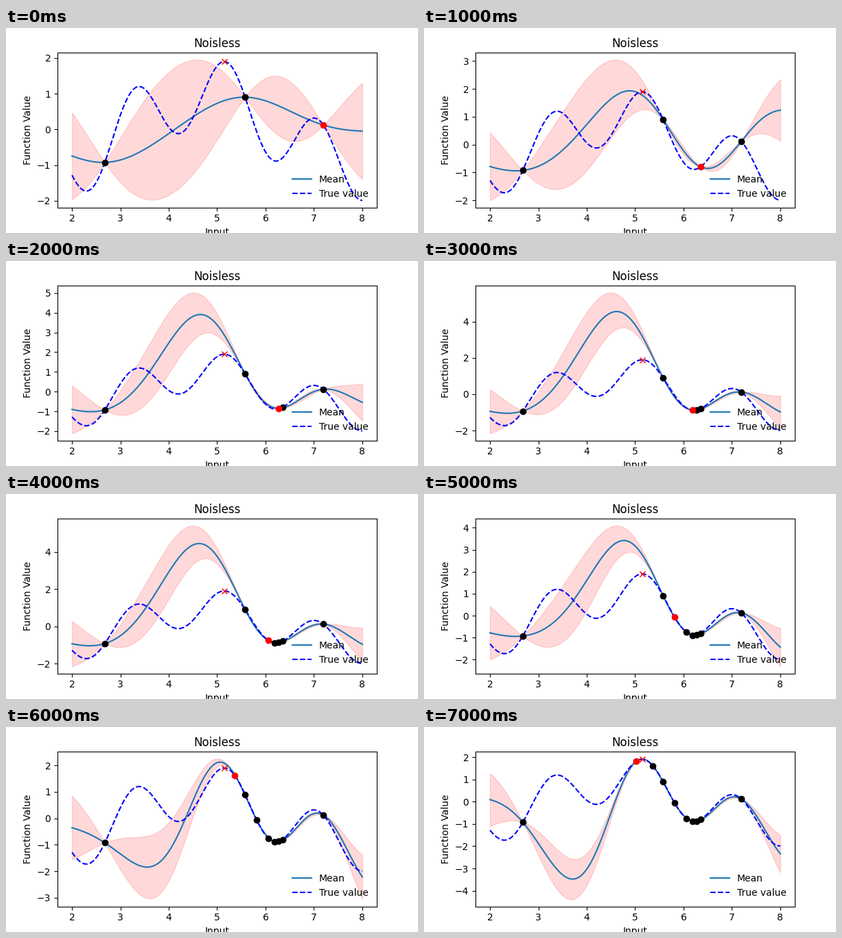
Recreate the animation shown at these times as a matplotlib script. Size 600 by 300 pixels, loop 8000 ms.

```python
import numpy as np
import matplotlib.pyplot as plt
from matplotlib.animation import FuncAnimation

NOISE = 1e-4
START = 3                 # samples known in the first step
BEST = 5.1457             # where the true function peaks
SAMPLES = np.array([2.678, 5.578, 7.195, 6.353, 6.277,
                    6.19, 6.06, 5.817, 5.367, 5.025])
GRID = np.linspace(2, 8, 300)


def truth(x):
    return -np.sin(x) - np.sin(10 * x / 3)


def kernel(a, b):
    return np.exp(-0.5 * (a[:, None] - b[None, :]) ** 2)


def posterior(x):
    """Gaussian process mean and deviation on the grid, given samples x."""
    cov = kernel(x, x) + NOISE * np.eye(len(x))
    cross = kernel(x, GRID)
    weights = np.linalg.solve(cov, cross)
    var = 1 - np.sum(cross * weights, axis=0)
    return weights.T @ truth(x), np.sqrt(np.maximum(var, 0))


fig, ax = plt.subplots(figsize=(6, 3), dpi=100)
fig.subplots_adjust(left=0.125, right=0.9, bottom=0.125, top=0.88)


def draw(step):
    x = SAMPLES[:START + step]
    mean, dev = posterior(x)
    ax.clear()
    ax.plot(GRID, mean, label="Mean")
    ax.plot(GRID, truth(GRID), "b--", label="True value")
    ax.fill_between(GRID, mean - 2 * dev, mean + 2 * dev,
                    color="red", alpha=0.15)
    ax.plot(BEST, truth(BEST), "rx")
    ax.plot(x[:-1], truth(x[:-1]), "ko")
    ax.plot(x[-1], truth(x[-1]), "ro")
    ax.set_title("Noisless")
    ax.set_xlabel("Input")
    ax.set_ylabel("Function Value")
    ax.legend(loc="lower right", frameon=False)


anim = FuncAnimation(fig, draw, frames=len(SAMPLES) - START + 1,
                     interval=1000, repeat=True)
plt.show()
```
